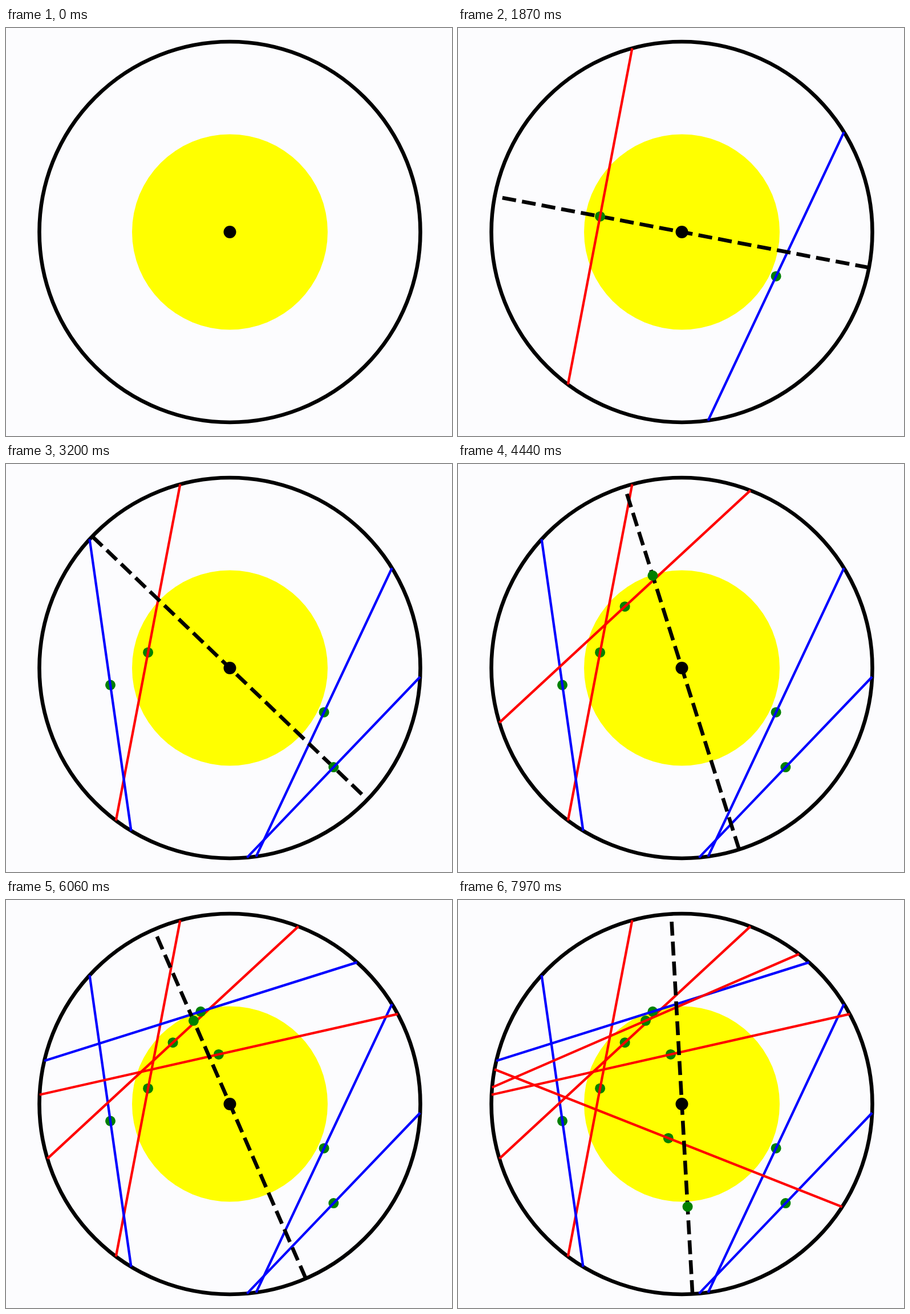
Recreate the animation shown at these times as an HTML page with a canvas. Size 782 px wide and 716 px high, loop 8 s.

```html
<!DOCTYPE html>
<html lang="en">
<head>
<meta charset="utf-8">
<title>Random chords from random radial points</title>
<style>
  html, body { margin: 0; width: 100%; height: 100%; overflow: hidden; background: #fcfcfe; }
  canvas { display: block; }
</style>
</head>
<body>
<canvas width="782" height="716"></canvas>
<script>
const ctx = document.querySelector('canvas').getContext('2d');
const LOOP = 8000, PERIOD = 818;
const FIRST_DIAMETER = 319, FIRST_CHORD = 745;
const CX = 392.5, CY = 358, R = 334;

// Diameter angle in degrees and signed distance of the chord's midpoint from the centre
const chords = [
  [25.2, 182.5], [10.8, -146], [171.9, 211.6], [223.75, -251.8], [47.2, -147],
  [72.5, -170], [77.3, -89.2], [66.5, -159.4], [111.6, 64.4], [86.8, 180.5]
];

function disc(x, y, r, color) {
  ctx.beginPath();
  ctx.arc(x, y, r, 0, 2 * Math.PI);
  ctx.fillStyle = color;
  ctx.fill();
}

function line(x1, y1, x2, y2, width, color, dash = []) {
  ctx.beginPath();
  ctx.moveTo(x1, y1);
  ctx.lineTo(x2, y2);
  ctx.setLineDash(dash);
  ctx.lineWidth = width;
  ctx.strokeStyle = color;
  ctx.stroke();
  ctx.setLineDash([]);
}

function drawStep([degrees, dist], showDiameter, showChord) {
  const angle = degrees * Math.PI / 180;
  const ux = Math.cos(angle), uy = Math.sin(angle);
  const mx = dist * ux, my = dist * uy;
  if (showDiameter) line(R * ux, R * uy, -R * ux, -R * uy, 6.6, '#000', [24.4, 10.6]);
  disc(mx, my, 9, '#008000');
  if (showChord) {
    const half = Math.sqrt(R * R - dist * dist);
    const color = Math.abs(dist) < R / 2 ? '#f00' : '#00f';
    line(mx - half * uy, my + half * ux, mx + half * uy, my - half * ux, 4.3, color);
  }
}

function draw(t) {
  ctx.setTransform(1, 0, 0, 1, 0, 0);
  ctx.fillStyle = '#fcfcfe';
  ctx.fillRect(0, 0, 782, 716);
  ctx.translate(CX, CY);

  disc(0, 0, 171.5, '#ff0');
  ctx.beginPath();
  ctx.arc(0, 0, R, 0, 2 * Math.PI);
  ctx.lineWidth = 6.6;
  ctx.strokeStyle = '#000';
  ctx.stroke();

  const current = Math.floor((t - FIRST_DIAMETER) / PERIOD);
  chords.slice(0, current + 1).forEach((chord, i) =>
    drawStep(chord, i === current, t >= FIRST_CHORD + i * PERIOD));
  disc(0, 0, 11, '#000');
}

const start = performance.now();
function tick() {
  draw((performance.now() - start) % LOOP);
  requestAnimationFrame(tick);
}
tick();
</script>
</body>
</html>
```
